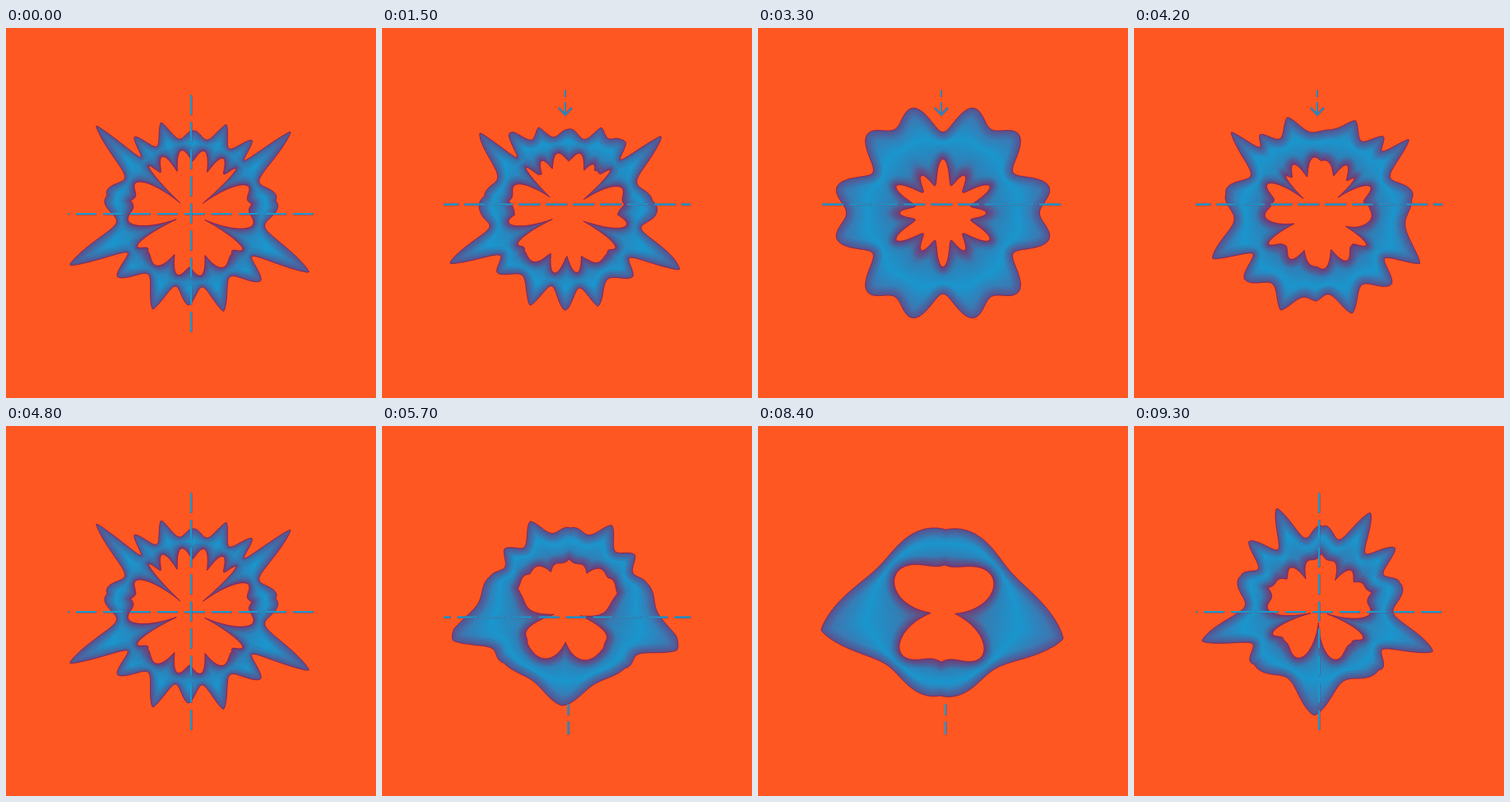
An HTML page with a canvas for the animation above (9.6 s loop, 450 by 450 pixels).

```html
<!DOCTYPE html>
<html lang="en">
<head>
<meta charset="utf-8">
<title>Wobbling ring</title>
<style>
html, body { margin: 0; height: 100%; overflow: hidden; background: #ff5722; }
canvas { display: block; width: 100vw; height: 100vh; }
</style>
</head>
<body>
<canvas id="stage" width="450" height="450"></canvas>
<script>
const ctx = document.getElementById('stage').getContext('2d');
const STEP = 300, HOLD = 1500, LOOP = 9600;
const CENTER = 225, TURN = 360, SLICE = .5;
const lerp = (a, b, k) => a + (b - a) * k;
const rad = deg => deg * Math.PI / 180;
const cos = deg => Math.cos(rad(deg));

// A profile maps an angle, clockwise from the top, to [outer, inner] radius.
// Lobes are [angle, outer, inner] on one half; the other half mirrors it.
// Between two lobes both rims bend towards the valley radii.
function lobed(lobes, valley, power, tilt = 0) {
  return angle => {
    const a = Math.abs((angle - tilt + 540) % TURN - 180);
    const i = Math.max(1, lobes.findIndex(lobe => a <= lobe[0]));
    const from = lobes[i - 1], to = lobes[i];
    const u = (a - from[0]) / (to[0] - from[0]);
    return [0, 1].map(rim => {
      const dip = Math.max(0, Math.sin(Math.PI * u)) ** power[rim];
      return lerp(lerp(from[rim + 1], to[rim + 1], u), valley[rim], dip);
    });
  };
}

// Sum of cosines; each wave is [amplitude, phase], with 1, 2, 3... turns.
const waves = (mean, ...list) => angle =>
  list.reduce((sum, [size, phase], i) => sum + size * cos((i + 1) * angle - phase), mean);

const mask = lobed([[0, 100, 63], [20, 116, 53], [38, 115, 62], [49, 157, 17], [80, 104, 75],
  [115, 161, 18], [133, 118, 70], [160, 126, 54], [180, 112, 66]], [91, 77], [1.4, 1.2], 1.7);
const petals = lobed([[0, 107, 65], [33, 152, 20], [53, 124, 42], [92, 131, 28],
  [113, 138, 19], [155, 105, 42], [180, 140, 8]], [90, 67], [1.8, 1]);
const gear = a => [120 - 12 * cos(12 * a) - 9.5 * cos(6 * a), 47 + 12 * cos(12 * a) + 6.5 * cos(6 * a)];
const knotOuter = waves(94.6, [18.4, 228], [6.8, -28], [13.4, -8], [3.5, 131]);
const knotInner = waves(47.4, [29.6, 198], [7.3, 204], [6.6, 58]);
const knot = a => [knotOuter(a), knotInner(a)];
const collar = lobed([[0, 99, 56], [101, 150, 15], [180, 103, 62]], [94, 73], [1.3, 1.7], 2);
const crest = lobed([[0, 103, 70], [25, 135, 42], [48, 120, 55], [68, 104, 68],
  [107, 147, 10], [132, 102, 56], [180, 127, 14]], [90, 63], [1.6, 1.1], 2.6);

const keys = [[0, mask], [4, petals], [7, gear], [12, mask], [14, crest], [16, collar],
  [19, knot], [24, collar], [27, crest], [28, mask]];

function point(r, angle) {
  return [CENTER + r * Math.sin(rad(angle)), CENTER - r * cos(angle)];
}

function rim(radii, side) {
  radii.forEach((r, i) => ctx[i ? 'lineTo' : 'moveTo'](...point(r[side], i * SLICE)));
  ctx.closePath();
}

// One radial slice, purple at the inner edge and blue towards the outer one.
function drawSlice([outer, inner], angle) {
  const g = ctx.createLinearGradient(...point(inner, angle), ...point(outer, angle));
  g.addColorStop(0, '#704580');
  g.addColorStop(.28, '#2e7fb8');
  g.addColorStop(.6, '#1996cd');
  g.addColorStop(1, '#4c6aa6');
  ctx.fillStyle = g;
  ctx.beginPath();
  for (const [r, side] of [[inner, -1], [outer, -1], [outer, 1], [inner, 1]]) {
    ctx.lineTo(...point(r, angle + side * SLICE));
  }
  ctx.fill();
}

function drawRing(a, b, k) {
  const radii = Array.from({ length: TURN / SLICE }, (_, i) => {
    const p = a(i * SLICE), q = b(i * SLICE);
    return [lerp(p[0], q[0], k), lerp(p[1], q[1], k)];
  });
  const outline = () => {
    ctx.beginPath();
    rim(radii, 0);
    rim(radii, 1);
  };
  ctx.save();
  outline();
  ctx.clip('evenodd');
  radii.forEach((r, i) => drawSlice(r, i * SLICE));
  outline();
  ctx.strokeStyle = 'rgba(105,55,120,.13)';
  for (const width of [20, 14, 9, 5]) {
    ctx.lineWidth = width;
    ctx.stroke();
  }
  ctx.restore();
  ctx.lineWidth = 1;
  ctx.strokeStyle = 'rgba(135,30,80,.85)';
  ctx.stroke();
}

function bar(x, y, w, h) {
  ctx.fillStyle = '#6b4a80';
  ctx.fillRect(x, y, w + .5, h + .5);
  ctx.fillStyle = '#179bce';
  ctx.fillRect(x, y, w, h);
}

function dashes(y, start, length) {
  for (let x = start - 66; x < 375; x += 33) {
    const left = Math.max(75, x), right = Math.min(375, x + length);
    if (right > left) bar(left, y, right - left, 2);
  }
}

function drawCross() {
  dashes(225, 85, 24.5);
  for (let y = 81.5; y < 369; y += 33) bar(224, y, 2, 24);
}

function drawTopArrow(n) {
  const x = CENTER + 4 * cos((n - 4) * 40);
  dashes(213.5, 89 - (n - 4) * 11 / 3, 26);
  bar(x - 1, 75.5, 1.5, 8);
  bar(x - 1, 90, 1.5, 15);
  ctx.beginPath();
  ctx.moveTo(x - 8, 97);
  ctx.lineTo(x, 105.5);
  ctx.lineTo(x + 8, 97);
  for (const [color, width] of [['#6b4a80', 2.6], ['#179bce', 1.7]]) {
    ctx.strokeStyle = color;
    ctx.lineWidth = width;
    ctx.stroke();
  }
}

function drawBottomMark(n) {
  const x = CENTER - 4 * Math.cos((n - 19) * .485);
  if (n < 22) dashes(231.5, 77 - (n - 19) * 11 / 3, 24.5);
  bar(x - 1, 338, 2, 13.5);
  bar(x - 1, 359.5, 2, 15.5);
}

function draw(n) {
  ctx.fillStyle = '#ff5722';
  ctx.fillRect(0, 0, 450, 450);
  const i = keys.findIndex((key, j) => n < keys[j + 1][0]);
  const [n0, a] = keys[i], [n1, b] = keys[i + 1];
  drawRing(a, b, (n - n0) / (n1 - n0));
  if (n === 0 || n === 27 || (n >= 12 && n <= 14)) drawCross();
  else if (n < 12) drawTopArrow(n);
  else drawBottomMark(n);
}

let shown = -1;
function tick() {
  const t = performance.now() % LOOP;
  const n = t < HOLD ? 0 : 1 + Math.floor((t - HOLD) / STEP);
  if (n !== shown) draw(shown = n);
  requestAnimationFrame(tick);
}
tick();
</script>
</body>
</html>
```
